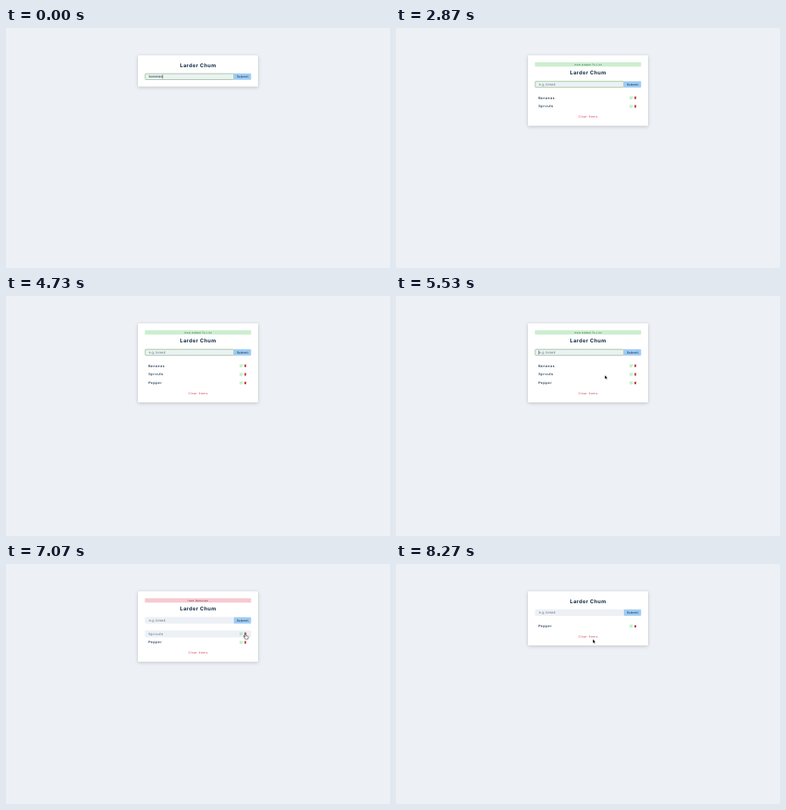
An HTML page for the animation above (8.34 s loop, 480 px wide and 300 px high).

```html
<!DOCTYPE html>
<html lang="en">
<head>
<meta charset="utf-8">
<title>Grocery list</title>
<style>
  html, body { margin: 0; height: 100%; overflow: hidden; background: #edf1f6; }
  svg { display: block; width: 100vw; height: 100vh; }
  text {
    font: 400 4.286px Inter, "Open Sans", sans-serif;
    fill: #102a42;
    text-rendering: geometricPrecision;
    white-space: pre;
  }
  .spaced { letter-spacing: .43px; }
  .middle { text-anchor: middle; }
  .heading { font-size: 6.43px; font-weight: 700; }
  .button { font-size: 3.64px; font-weight: 500; }
  .notice { font-size: 3px; }
  .item { font-weight: 500; }
  #card { fill: #fff; filter: drop-shadow(0 1.3px 2px rgba(0, 0, 0, .2)); }
  #clear text { fill: #cf3350; font-weight: 400; }
  #field { fill: #edf1f6; stroke-width: .8; }
</style>
</head>
<body>
<svg viewBox="0 0 480 300">
  <defs>
    <g id="icons">
      <path d="M294.4 76.3h-1.8v2.7h2.6v-1.3M293.6 78l.2-.7 1.5-1.5.5.5-1.5 1.5z"
            fill="none" stroke="#6be68a" stroke-width=".5"/>
      <path d="M297.8 76.2h.8l.2-.3h.7l.2.3h.8v.4h-2.7zM298 76.9h2.3l-.2 2.3h-1.9z" fill="#bb2525"/>
    </g>
  </defs>

  <rect id="card" x="165" y="34.3" width="150" rx="1.07"/>
  <g id="alert">
    <rect id="alertBox" x="173.6" y="42.87" width="132.8" height="5.36" rx=".6"/>
    <text id="alertText" class="spaced middle notice" x="240.2" y="46.65"></text>
  </g>
  <g id="content">
    <text class="spaced middle heading" x="240.2" y="48.7">Larder Chum</text>
    <rect id="field" x="174" y="57.1" width="110.7" height="7.4" rx=".8"/>
    <text id="entry" x="178.6" y="62.3"></text>
    <rect id="caret" y="58.4" width=".5" height="5" fill="#102a42"/>
    <path d="M284.8 56.75h20.5a1.07 1.07 0 0 1 1.1 1.07v5.96a1.07 1.07 0 0 1-1.1 1.07h-20.5z" fill="#9dcbf3"/>
    <text class="spaced middle button" x="295.8" y="62.1">Submit</text>
    <g id="list"></g>
    <g id="clear"><text class="spaced middle button" x="240.2" y="81">Clear Items</text></g>
  </g>

  <g id="pointer" stroke-linejoin="round">
    <path id="beam" d="M-1-3h2M0-3v6M-1 3h2" fill="none" stroke="#222" stroke-width=".5"/>
    <path id="arrow" d="M0 0v5l1.2-1.1.8 1.8.9-.4-.8-1.7h1.6z" fill="#000" stroke="#fff" stroke-width=".35"/>
    <path id="hand" d="M-.6.5Q0-.4.6.5V2.4L2.9 3Q3.5 3.3 3.3 4.4L2.7 6.7H-.6L-2.3 4Q-2-.0 -1.9 3.2L-.6 4z"
          fill="#fff" stroke="#222" stroke-width=".55"/>
  </g>
</svg>
<script>
const LOOP = 8340, STEP = 1000 / 15;
const ROW_PITCH = 10.71, ALERT_SHIFT = 9.65;
const BLURRED_AT = 6470;
const $ = id => document.getElementById(id);

const words = [
  { text: "bananas", keys: [0, 0, 0, 0, 0, 0, 0], submit: 130 },
  { text: "sprouts", keys: [1200, 1330, 1530, 1800, 2000, 2130, 2330], submit: 2670 },
  { text: "pepper", keys: [3470, 3600, 3730, 3930, 4070, 4200], submit: 4730 }
];
const items = [
  { name: "Bananas", from: 130, to: BLURRED_AT, enter: 6000, leave: LOOP },
  { name: "Sprouts", from: 2670, to: 7270, enter: 6530, leave: LOOP },
  { name: "Pepper", from: 4730, to: LOOP, enter: 7270, leave: 7400 }
];
const alerts = [
  { from: 130, to: 3130, text: "Item Added To List", back: "#cceecf", ink: "#155724" },
  { from: 4730, to: BLURRED_AT, text: "Item Added To List", back: "#cceecf", ink: "#155724" },
  { from: BLURRED_AT, to: 7730, text: "Item Removed", back: "#f7c9d1", ink: "#721c24" }
];
const caretHidden = [[470, 930], [2870, 3330], [4670, 5130], [5600, 6070], [BLURRED_AT, LOOP]];
const path = [
  [5200, 230, 67], [5470, 252, 92], [5670, 282, 115], [5930, 295, 98], [6130, 299.6, 87.3],
  [7330, 299.6, 87.3], [7730, 246, 99], [8130, 246, 99], [8200, 245.5, 96], [8270, 246, 94]
];
const pointerShapes = [[5200, "beam"], [5330, "arrow"], [6000, "hand"], [7400, "arrow"], [7670, "hand"], [8200, "arrow"]];

const within = (t, from, to) => t >= from && t < to;
const clamp = x => Math.min(1, Math.max(0, x));
const show = (node, on) => node.setAttribute("visibility", on ? "inherit" : "hidden");
const move = (node, x, y) => node.setAttribute("transform", `translate(${x} ${y})`);

for (const item of items) {
  const row = document.createElementNS("http://www.w3.org/2000/svg", "g");
  row.innerHTML = `<rect x="173.6" y="73.45" width="132.8" height="8.57" rx="1.07" fill="#edf1f6"/>
    <text class="spaced item" x="177.9" y="79.1">${item.name}</text><use href="#icons"/>`;
  $("list").append(row);
  item.row = row;
  [item.back, item.label] = row.children;
}

function pointerAt(t) {
  const next = path.findIndex(p => p[0] > t);
  if (next < 0) return path.at(-1).slice(1);
  const [t0, x0, y0] = path[next - 1], [t1, x1, y1] = path[next];
  const k = (t - t0) / (t1 - t0);
  return [x0 + (x1 - x0) * k, y0 + (y1 - y0) * k];
}

function drawList(t) {
  let count = 0;
  for (const item of items) {
    const present = within(t, item.from, item.to);
    show(item.row, present);
    if (!present) continue;
    const hover = clamp((t - item.enter) / 300) - clamp((t - item.leave) / 300);
    move(item.row, 0, count++ * ROW_PITCH);
    item.back.setAttribute("opacity", hover);
    item.label.style.fill = `color-mix(in srgb, #617d98 ${hover * 100}%, #102a42)`;
  }
  show($("clear"), count > 0);
  move($("clear"), 0, count * ROW_PITCH);
  return count;
}

function drawField(t) {
  const word = words.find(w => t < w.submit);
  const typed = word ? word.text.slice(0, word.keys.filter(k => k <= t).length) : "";
  const entry = $("entry");
  entry.textContent = typed || "e.g. bread";
  entry.style.fill = typed ? "#102a42" : "#667480";
  $("caret").setAttribute("x", 178.5 + (typed ? entry.getComputedTextLength() : 0));
  show($("caret"), !caretHidden.some(([from, to]) => within(t, from, to)));
  $("field").setAttribute("stroke", t < BLURRED_AT ? "#8cc084" : "#edf1f6");
}

function drawPointer(t) {
  const current = pointerShapes.findLast(s => s[0] <= t);
  for (const id of ["beam", "arrow", "hand"]) show($(id), current && current[1] === id);
  if (current) move($("pointer"), ...pointerAt(t));
}

function draw(t) {
  const alert = alerts.find(a => within(t, a.from, a.to));
  const shift = alert ? ALERT_SHIFT : 0;
  show($("alert"), alert);
  if (alert) {
    $("alertText").textContent = alert.text;
    $("alertText").style.fill = alert.ink;
    $("alertBox").style.fill = alert.back;
  }
  const count = drawList(t);
  const bottom = count ? 91.15 + count * ROW_PITCH : 73.3;
  $("card").setAttribute("height", bottom + shift - 34.3);
  move($("content"), 0, shift);
  drawField(t);
  drawPointer(t);
}

const start = performance.now();
function tick() {
  const t = (performance.now() - start) % LOOP;
  // The motion is sampled at 15 steps a second, on a 10 ms grid.
  draw(Math.round(Math.floor((t + 5) / STEP) * STEP / 10) * 10);
  requestAnimationFrame(tick);
}
tick();
</script>
</body>
</html>
```
